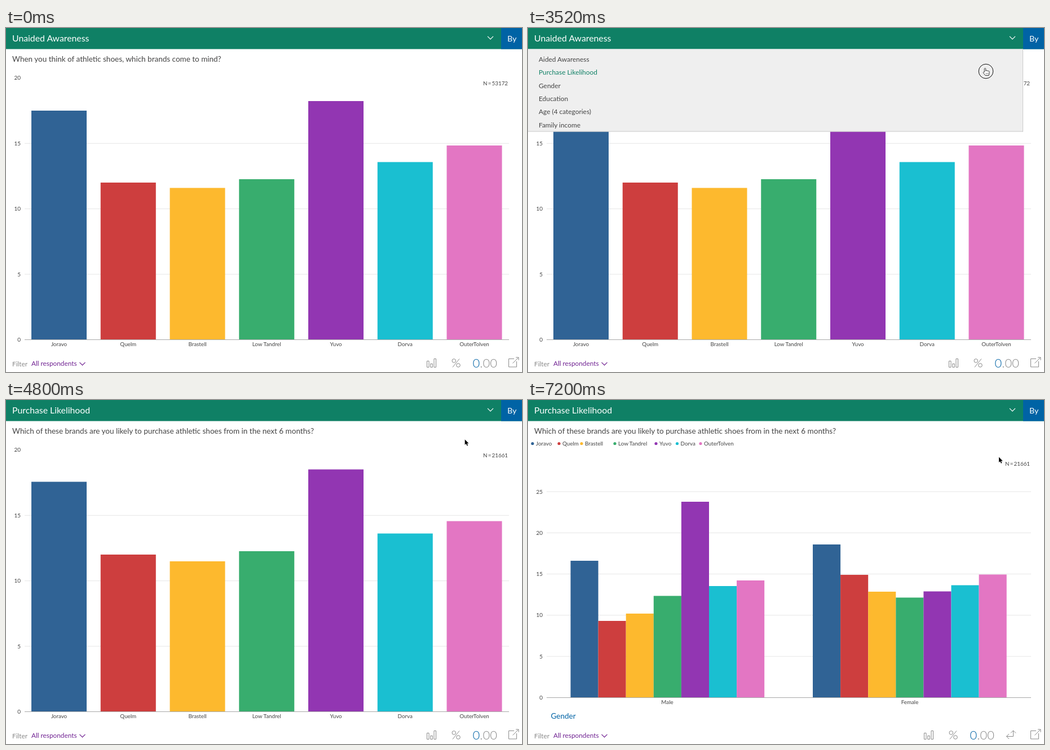
An HTML page for the animation above (8 s loop, 915 by 612 pixels).

```html
<!DOCTYPE html>
<html lang="en">
<head>
<meta charset="utf-8">
<title>Survey chart</title>
<style>
  html, body { margin: 0; width: 100%; height: 100%; overflow: hidden; background: #fff; }
  svg { display: block; width: 100%; height: 100%; font-family: Lato, "Open Sans", sans-serif; }
</style>
</head>
<body>
<svg id="stage" viewBox="0 0 915 612"></svg>
<script>
const LOOP = 8000, STEP = 160;
const GREEN = '#0f8065', BLUE = '#0063a5', NAVY = '#005083', INK = '#444', GREY = '#8a8a8a';
const COLORS = ['#306395', '#cd3e3e', '#fdb92e', '#38ad6e', '#9236b2', '#1abfd1', '#e376c3'];
const BRANDS = ['Joravo', 'Quelm', 'Brastell', 'Low Tandrel', 'Yuvo', 'Dorva', 'OuterTolven'];
const LEGEND_X = [8, 55, 95, 154, 227, 264.5, 306];
const AWARENESS = [147, 275, 284.5, 269, 130, 238.5, 209];
const PURCHASE = [145.5, 275, 287, 269, 123.5, 237.5, 215.5];
const MALE = [286, 393, 380, 348.5, 181, 331, 321];
const FEMALE = [257, 311, 341, 351.5, 340.5, 329.5, 310.5];
const SHARED = ['Gender', 'Education', 'Age (4 categories)', 'Family income'];
const TOPICS = ['Aided Awareness', 'Purchase Likelihood', ...SHARED];
const SPLITS = ['Unaided Awareness', 'Aided Awareness', ...SHARED];

// Pointer moves: start, end, from x/y, to x/y
const MOVES = [
  [480, 800, 905, 17, 861.5, 15.5],
  [2240, 3200, 861.5, 15.5, 810.5, 71.5],
  [4640, 5440, 811, 72, 895, 15],
  [5920, 6560, 895, 15, 835, 101.5]
];
const CLICKS = [1440, 3520, 5440];

const clamp = v => Math.max(0, Math.min(1, v));
const ease = p => p < .5 ? 4 * p ** 3 : 1 - (2 - 2 * p) ** 3 / 2;
const span = (t, a, b) => ease(clamp((t - a) / (b - a)));

const text = (s, x, y, size, fill = INK, extra = '') =>
  `<text x="${x}" y="${y}" font-size="${size}" fill="${fill}" ${extra}>${s}</text>`;
const mid = 'text-anchor="middle"', end = 'text-anchor="end"';
const rect = (x, y, w, h, fill) =>
  `<rect x="${x}" y="${y}" width="${w}" height="${h}" fill="${fill}"/>`;
const line = (d, color, w = 1) =>
  `<path d="${d}" fill="none" stroke="${color}" stroke-width="${w}"/>`;

function axis(base, gap, max, topLine) {
  let out = '';
  for (let v = 0; v <= max; v += 5) {
    const y = base - v * gap;
    if (v && (v < max || topLine)) out += line(`M33 ${y}H892`, '#e6e6e6');
    out += text(v, 26, y + 3.5, 10, INK, end);
  }
  return out;
}

const baseline = y => line(`M33 ${y}H892`, '#a8a8a8');

const bars = (tops, x, pitch, w, base) =>
  tops.map((y, i) => rect(x + pitch * i, y, w, base - y, COLORS[i])).join('');

const total = (n, y) => text(`N\u2009=\u2009${n}`, 890, y, 9.8, INK, end);

function simpleChart(tops, n) {
  const names = BRANDS.map((b, i) => text(b, 94 + 122.75 * i, 565.5, 9.8, INK, mid)).join('');
  return axis(554.5, 23.28, 20, false) + bars(tops, 45, 122.75, 98, 554.5) +
    baseline(554.5) + names + total(n, 101.5);
}

function splitChart() {
  const legend = BRANDS.map((b, i) =>
    `<circle cx="${LEGEND_X[i]}" cy="77.5" r="2.6" fill="${COLORS[i]}"/>` +
    text(b, LEGEND_X[i] + 6, 81, 9.8)).join('');
  return legend + axis(529.5, 14.66, 25, true) +
    bars(MALE, 75.5, 49.1, 49.1, 529.5) + bars(FEMALE, 505, 49.1, 49.1, 529.5) +
    baseline(529.5) + text('Male', 247, 540.5, 9.8, INK, mid) +
    text('Female', 677, 540.5, 9.8, INK, mid) +
    text('Gender', 40.5, 567, 13.5, BLUE) + total(21661, 117);
}

function footer(split) {
  const tools =
    line('M746.5 592.5h3.5v11h-3.5zM752.8 597.5h3.5v6h-3.5zM759 588.5h3.5v15h-3.5z', GREY) +
    line('M804 588.5L792 603.5', GREY) +
    `<g fill="none" stroke="${GREY}"><circle cx="794.3" cy="592" r="3.3"/><circle cx="802" cy="600" r="3.3"/></g>` +
    text(`<tspan fill="${BLUE}">0</tspan>.00`, 827.5, 604, 22, GREY, 'font-weight="300"');
  const flip = line('M848.5 598.5H860.5V588M853 594L848.5 598.5L853 603M856 592.5L860.5 588L865 592.5', GREY);
  return text('Filter', 11, 601.5, 11.8, GREY) +
    text('All respondents', 45, 600.8, 11.8, '#702292') +
    line('M130.5 594.8l5 5 5-5', '#702292', 1.2) +
    `<g transform="translate(${split ? -44 : 0})">${tools}</g>` + (split ? flip : '') +
    line('M901 588.5H891.5V603H905.5V593M898.5 596.5L909 586M904 586H909V591', GREY);
}

const itemAt = y => Math.floor((y - 44) / 23.4);

function menu(items, x, w, open, hover, color) {
  const h = 147 * open;
  if (h < 1) return '';
  const rows = items.map((s, i) =>
    60 + 23.4 * i > 37.5 + h ? '' :
    text(s, x, 59.8 + 23.4 * i, 11.9, i === hover ? color : INK)).join('');
  const left = x < 20 ? 0 : x - 21;
  const side = x < 20 ? left + w - .5 : left + .5;
  return rect(left, 37.5, w, h, '#efefef') +
    line(`M${left} ${37 + h}H${left + w}M${side} 37.5V${37.5 + h}`, '#cbcbcb') + rows;
}

function pointer(x, y, hand, ring) {
  const shape = hand
    ? '<path d="M-1.2 7V1.2a1.2 1.2 0 0 1 2.4 0V5l.3-.4a1.1 1.1 0 0 1 2.1.4a1.1 1.1 0 0 1 2 .4a1 1 0 0 1 1.8.6V9.5L6.5 13H.5L-3.2 8.2a1.2 1.2 0 0 1 2-1.2Z" fill="#fff" stroke="#222" stroke-width=".9"/>' +
      line('M1.6 8.5V11M3.4 8.5V11M5.2 8.5V11', '#444', .6)
    : '<path d="M0 0V9.6L2.2 7.6L3.9 11.2L5.4 10.5L3.8 7H6.8Z" stroke="#fff" stroke-width="1" paint-order="stroke"/>';
  const halo = ring ? '<circle cx="1.5" cy="5.5" r="12.8" fill="none" stroke="#111"/>' : '';
  return `<g transform="translate(${x} ${y})">${halo}${shape}</g>`;
}

function pointerAt(t) {
  const m = MOVES.filter(k => t >= k[0]).pop() || MOVES[0];
  const p = span(t, m[0], m[1]);
  return [m[2] + (m[4] - m[2]) * p, m[3] + (m[5] - m[3]) * p];
}

function scene(t) {
  const [x, y] = pointerAt(t);
  const seen = t >= 640, split = t >= 7200;
  const topicOpen = t < 3680 ? span(t, 1440, 2080) : 0;
  const splitOpen = split ? 0 : span(t, 5440, 5760);
  const left = 878 - 782 * splitOpen;
  const overBy = seen && !split && x > 878 && y < 37;
  const asked = t < 3840
    ? 'When you think of athletic shoes, which brands come to mind?'
    : 'Which of these brands are you likely to purchase athletic shoes from in the next 6 months?';

  let out = rect(0, 0, 915, 612, '#fff') + text(asked, 11, 59.6, 13.5);
  if (t < 3680) out += simpleChart(AWARENESS, 53172);
  else if (split) out += splitChart();
  else if (t >= 3840) out += simpleChart(PURCHASE, 21661);
  out += footer(split);

  out += rect(0, 0, 915, 37.5, GREEN) +
    text(t < 3680 ? 'Unaided Awareness' : 'Purchase Likelihood', 11, 24, 15.8, '#fff') +
    line('M854 14.8l5 5 5-5', '#fff', 1.2);
  out += menu(TOPICS, 19, 878, topicOpen, t >= 2400 ? itemAt(y) : -1, GREEN);
  out += menu(SPLITS, left + 21, 915 - left, splitOpen, itemAt(y), BLUE);
  out += rect(left, 0, 915 - left, 37.5, overBy || splitOpen ? NAVY : BLUE) +
    text('By', left + 11, 24, 14.3, '#fff');

  if (seen) {
    const hand = !split && (y < 37 || topicOpen > 0 || splitOpen > 0);
    out += pointer(x, y, hand, CLICKS.includes(t));
  }
  return out;
}

const stage = document.getElementById('stage');
const start = performance.now();
let shown = -1;
function tick() {
  const t = Math.floor((performance.now() - start) % LOOP / STEP) * STEP;
  if (t !== shown) stage.innerHTML = scene(shown = t);
  requestAnimationFrame(tick);
}
tick();
</script>
</body>
</html>
```
